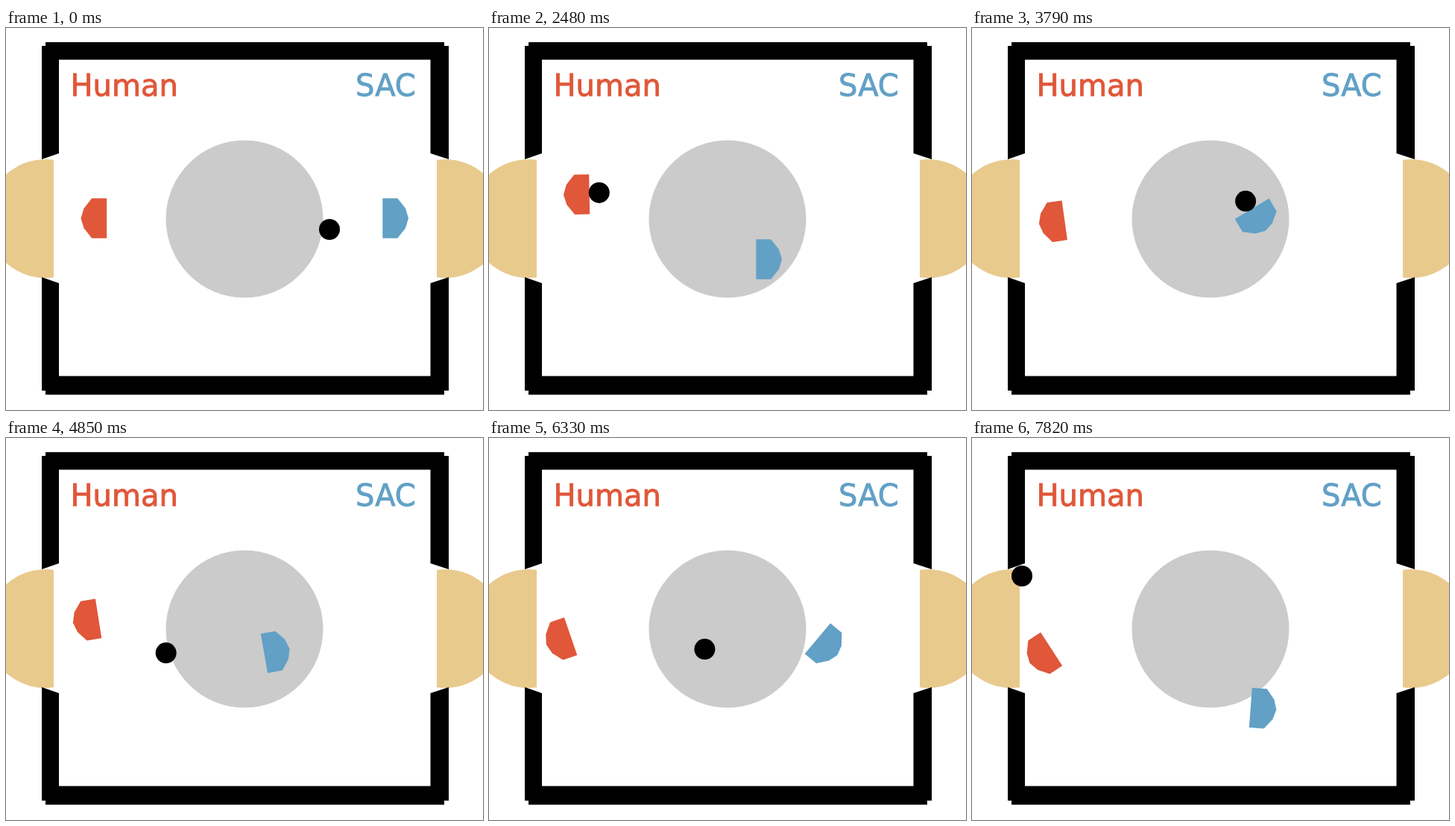
Recreate the animation shown at these times as an HTML page. Size 640 by 512 pixels, loop 8360 ms.

```html
<!DOCTYPE html>
<html lang="en">
<head>
<meta charset="utf-8">
<title>Air hockey</title>
<style>
  html, body { margin: 0; width: 100%; height: 100%; overflow: hidden; background: #fff; }
  svg { display: block; width: 100vw; height: 100vh; }
  text { font: 40px "DejaVu Sans", Verdana, sans-serif; stroke: currentColor; stroke-width: .9; }
  .goal { fill: #e9ca8d; }
  .red { fill: #e0573a; color: #e0573a; }
  .blue { fill: #62a0c6; color: #62a0c6; }
</style>
</head>
<body>
<svg viewBox="0 0 640 512">
  <defs>
    <clipPath id="left"><rect width="64" height="512"/></clipPath>
    <clipPath id="right"><rect x="578" width="62" height="512"/></clipPath>
    <path id="racket" d="M-13.3 26.7H6.7V-26.7H-13.3L-24 -13.3L-28 0L-24 13.3Z"/>
  </defs>
  <circle class="goal" cx="53" cy="255.5" r="79.5" clip-path="url(#left)"/>
  <circle class="goal" cx="589" cy="255.5" r="79.5" clip-path="url(#right)"/>
  <circle cx="320" cy="256" r="105.5" fill="#cbcbcb"/>
  <path d="M53 19H588V24H594V176L569.5 168V42.5H71V168L48 176V24H53Z"/>
  <path d="M53 491.5H588V486H594V334L569.5 342V466.5H71V342L48 334V486H53Z"/>
  <text class="red" x="86.5" y="91">Human</text>
  <text class="blue" x="469" y="91">SAC</text>
  <use id="human" class="red" href="#racket"/>
  <use id="agent" class="blue" href="#racket"/>
  <circle id="puck" r="14"/>
</svg>
<script>
const LOOP = 8360, FLOOR = 453;
const REACH = 19.8, SLIP = 2; // where a caught puck rests on the racket

// Poses: time, x, y, clockwise turn in degrees. Side is the way a racket faces.
const human = {
  el: document.getElementById('human'), side: 1,
  poses: [
    [270, 128.5, 255, 0], [1520, 128.3, 279.3, 0], [2480, 128, 223, -1],
    [3790, 117.6, 258.6, -8], [4850, 117.5, 243, -9],
    [6330, 103.3, 268, -19], [7820, 101, 286.6, -33]
  ]
};
const agent = {
  el: document.getElementById('agent'), side: -1,
  poses: [
    [270, 512, 255, 0], [700, 453, 261, -25], [1090, 478, 283, 10],
    [1520, 387.7, 290.7, 45], [2480, 365, 310, 0], [3790, 379, 248, 59],
    [4850, 353, 287.5, -10], [5400, 510, 265, 0], [6330, 446, 273, 40],
    [7040, 385, 355, -30], [7820, 380.5, 362, 4.3]
  ]
};

const mix = (a, b, k) => a.map((v, i) => v + (b[i] - v) * k);
const ease = k => k * k * (3 - 2 * k);

// Neighbouring keys around t and the share of the way between them.
function span(keys, t) {
  const i = Math.max(1, keys.findIndex(key => key[0] > t));
  const [a, b] = t < keys.at(-1)[0] ? [keys[i - 1], keys[i]] : keys.slice(-2);
  const k = (t - a[0]) / (b[0] - a[0]);
  return [a, b, Math.min(1, Math.max(0, k))];
}

function pose(player, t) {
  const [a, b, k] = span(player.poses, t);
  return mix(a, b, ease(k)).slice(1);
}

function held(player, t) {
  const [x, y, turn] = pose(player, t);
  const r = turn * Math.PI / 180, { side } = player;
  return [
    x + side * (REACH * Math.cos(r) + SLIP * Math.sin(r)),
    y + side * (REACH * Math.sin(r) - SLIP * Math.cos(r))
  ];
}

const at = (t, x, y) => [t, x, y];
const hold = (player, from, to) =>
  [from, to].map(t => [t, ...held(player, t), player]);

// A straight shot off the floor: equal angles and constant speed.
function bounce(a, b) {
  const fall = FLOOR - a[2], rise = FLOOR - b[2];
  const [t, x] = mix(a.slice(0, 2), b.slice(0, 2), fall / (fall + rise));
  return [a, at(t, x, FLOOR), b];
}

const [catch1, shot1] = hold(agent, 1400, 1930);
const [catch2, shot2] = hold(human, 2400, 2800);
const [catch3, shot3] = hold(agent, 3480, 4480);
const [catch4, shot4] = hold(human, 5850, 6020);
const [catch5, shot5] = hold(agent, 6600, 7050);
const path = [
  ...bounce(at(700, 434, 270), catch1),
  shot1, catch2,
  ...bounce(shot2, catch3),
  shot3, at(4850, 215, 288), at(5080, 140, 296), at(5480, 104, FLOOR),
  catch4, shot4, at(6330, 289, 283), catch5,
  ...bounce(shot5, at(7820, 67, 185))
];

function puckAt(t) {
  const [a, b, k] = span(path, t);
  const owner = a[3];
  return owner && owner === b[3]
    ? held(owner, t)
    : mix(a.slice(1, 3), b.slice(1, 3), k);
}

const puck = document.getElementById('puck');
function draw(t) {
  for (const player of [human, agent]) {
    const [x, y, turn] = pose(player, t);
    player.el.setAttribute('transform',
      `translate(${x} ${y}) rotate(${turn}) scale(${player.side} 1)`);
  }
  const [x, y] = puckAt(t);
  puck.setAttribute('cx', x);
  puck.setAttribute('cy', y);
}

const start = performance.now();
function tick() {
  draw((performance.now() - start) % LOOP);
  requestAnimationFrame(tick);
}
tick();
</script>
</body>
</html>
```
